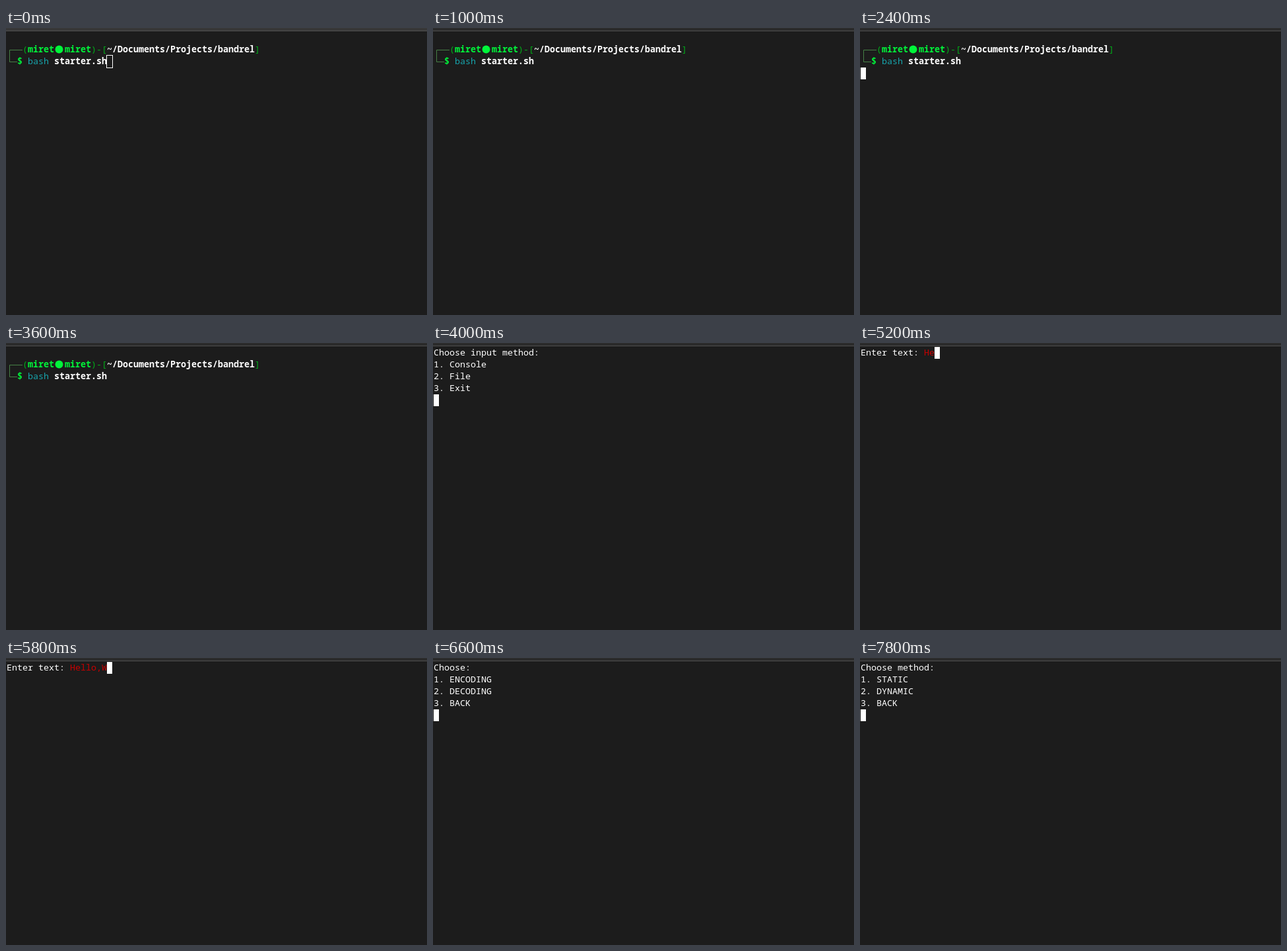
An HTML page for the animation above (8 s loop, 638 by 436 pixels).

```html
<!DOCTYPE html>
<html lang="en">
<head>
<meta charset="utf-8">
<title>Terminal session</title>
<style>
  html, body { margin: 0; width: 100%; height: 100%; overflow: hidden; background: #1c1c1c; }
  svg { display: block; }
  text {
    font: 500 13.3333px "Noto Sans Mono", "Liberation Mono", monospace;
    font-variant-ligatures: none;
    white-space: pre;
    fill: #fff;
  }
  .bold { font-weight: 700; }
  .user { font-weight: 700; fill: #00f53a; }
  .mark { fill: #00f53a; }
  .frame { fill: #00ad18; }
  .command { fill: #17a5ad; }
  .typed { fill: #c80000; }
  .rule { fill: none; stroke: #468046; }
</style>
</head>
<body>
<svg width="638" height="436" viewBox="0 0 638 436">
  <rect width="638" height="436" fill="#1c1c1c"/>
  <rect id="bar" width="638" height="4"/>
  <rect y="4" width="638" height="1" fill="#505050"/>
  <g id="screen"></g>
  <rect id="cursor"/>
</svg>
<script>
const LOOP = 8000, CELL = 8, LINE = 18, LEFT = 1, TOP = 6;
const bar = document.getElementById("bar");
const screen = document.getElementById("screen");
const cursor = document.getElementById("cursor");

const put = (col, row, str, cls = "") =>
  `<text x="${LEFT + col * CELL}" y="${TOP + 13 + row * LINE}" class="${cls}">${str}</text>`;

const lines = (...rows) => rows.map((str, row) => put(0, row, str)).join("");

const entry = typed => put(0, 0, "Enter text:") + put(12, 0, typed, "typed");

const prompt =
  `<path class="rule" d="M25 33.5H5.5V51.5H17"/>` +
  `<circle class="mark" cx="80.5" cy="32.5" r="6"/>` +
  put(3, 1, "(", "frame") + put(4, 1, "miret", "user") +
  put(11, 1, "miret", "user") + put(16, 1, ")-[", "frame") +
  put(19, 1, "~/Documents/Projects/bandrel", "bold") + put(47, 1, "]", "frame") +
  put(2, 2, "$", "user") + put(4, 2, "bash", "command") +
  put(9, 2, "starter.sh", "bold");

const inputMenu = lines("Choose input method:", "1. Console", "2. File", "3. Exit");
const modeMenu = lines("Choose:", "1. ENCODING", "2. DECODING", "3. BACK");
const methodMenu = lines("Choose method:", "1. STATIC", "2. DYNAMIC", "3. BACK");

// [start ms, screen, cursor column, cursor row, cursor look]
const steps = [
  [0, prompt, 19, 2, "hollow"],
  [200, prompt, 19, 2, "solid"],
  [600, prompt, 0, 3, "solid"],
  // the cursor blinks while the script starts
  ...[1000, 1600, 2000, 2400, 2600, 3000, 3600].map((t, i) =>
    [t, prompt, 0, 3, i % 2 ? "solid" : "off"]),
  [4000, inputMenu, 0, 4, "solid"],
  [4200, inputMenu, 0, 4, "off"],
  [4600, inputMenu, 0, 4, "solid"],
  ...[[4800, 0], [5200, 2], [5400, 4], [5600, 6], [5800, 7], [6200, 10], [6400, 12]].map(([t, n]) =>
    [t, entry("Hello,World!".slice(0, n)), 12 + n, 0, "solid"]),
  [6600, modeMenu, 0, 4, "solid"],
  [7200, methodMenu, 0, 4, "solid"],
  [7600, methodMenu, 0, 4, "off"],
  [7800, methodMenu, 0, 4, "solid"]
];

const setAttrs = (el, attrs) => {
  for (const name in attrs) el.setAttribute(name, attrs[name]);
};

function drawCursor(col, row, look) {
  const grow = look === "hollow" ? 0.5 : 0;
  setAttrs(cursor, {
    x: LEFT + col * CELL - grow,
    y: TOP + row * LINE - grow,
    width: CELL + 2 * grow,
    height: LINE + 2 * grow,
    fill: look === "solid" ? "#fff" : "none",
    stroke: look === "hollow" ? "#fff" : "none"
  });
}

let shownStep, shownScreen;
function draw(time) {
  const t = time % LOOP;
  const shade = t < 200 ? 56 : t < 400 ? 49 : 43;
  bar.setAttribute("fill", `rgb(${shade},${shade},${shade})`);
  const step = steps.findLast(s => s[0] <= t);
  if (step !== shownStep) {
    const [, content, col, row, look] = step;
    if (content !== shownScreen) screen.innerHTML = shownScreen = content;
    drawCursor(col, row, look);
    shownStep = step;
  }
}

const start = performance.now();
function tick() {
  draw(performance.now() - start);
  requestAnimationFrame(tick);
}
tick();
</script>
</body>
</html>
```
